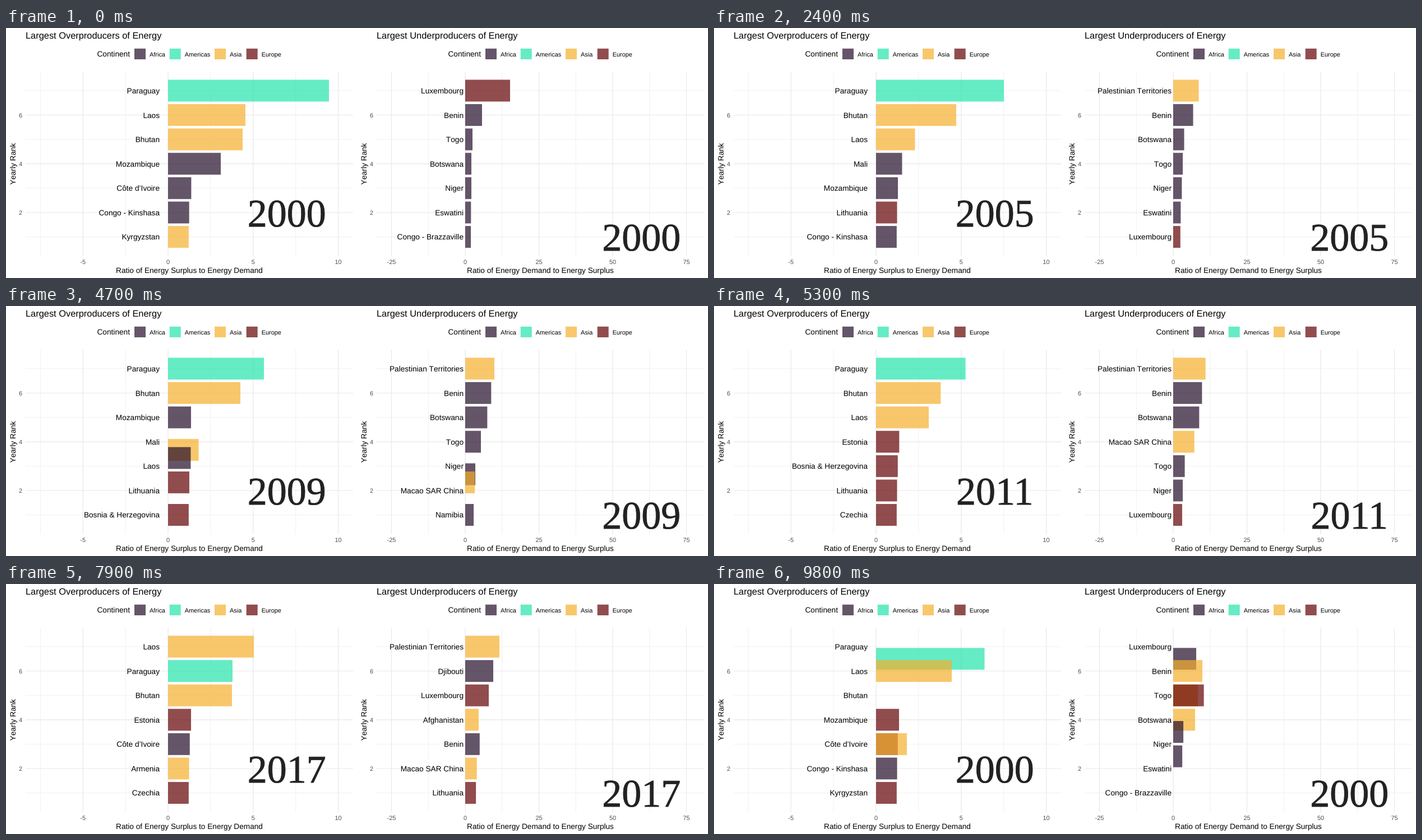
These frames come from a looping animation (1252 px wide and 447 px high, 9.9 s). An HTML page:

```html
<!DOCTYPE html>
<html lang="en">
<head>
<meta charset="utf-8">
<title>Energy ratios by country</title>
<style>
  html, body { margin: 0; width: 100%; height: 100%; overflow: hidden; background: #fff; }
  svg { display: block; width: 1252px; height: 447px; }
  text { font: 13.67px "Liberation Sans", Arial, sans-serif; font-kerning: none; text-rendering: geometricPrecision; }
  .title { font-size: 16.4px; }
  .small { font-size: 10.93px; }
  .tick { font-size: 10.93px; fill: #4d4d4d; }
  .mid { text-anchor: middle; }
  .end { text-anchor: end; }
  .year { font: 70px "Liberation Serif", Times, serif; fill: #222; stroke: #222; stroke-width: .8; text-anchor: middle; }
  .grid { stroke: #ebebeb; }
</style>
</head>
<body>
<svg viewBox="0 0 1252 447"><g id="base"></g><g id="live"></g></svg>
<script>
const COLORS = { Africa: '#240e2a', Americas: '#24e4ac', Asia: '#f6af2d', Europe: '#630004' };
const ALPHA = 0.7;

const PLACES = {
  Africa: { MZ: 'Mozambique', CI: 'Côte d’Ivoire', CD: 'Congo - Kinshasa', ML: 'Mali', BJ: 'Benin', TG: 'Togo',
    BW: 'Botswana', NE: 'Niger', SZ: 'Eswatini', CG: 'Congo - Brazzaville', NA: 'Namibia', DJ: 'Djibouti' },
  Americas: { PY: 'Paraguay' },
  Asia: { LA: 'Laos', BT: 'Bhutan', KG: 'Kyrgyzstan', TM: 'Turkmenistan', AM: 'Armenia',
    PS: 'Palestinian Territories', MO: 'Macao SAR China', AF: 'Afghanistan' },
  Europe: { LT: 'Lithuania', EE: 'Estonia', CZ: 'Czechia', BA: 'Bosnia &amp; Herzegovina', LU: 'Luxembourg' }
};
const place = {};
for (const area in PLACES)
  for (const code in PLACES[area]) place[code] = { name: PLACES[area][code], area };

// ranking: one row per year, best first.
// lead: lengths of the top bars at the key years; tail: rule for the bars below them.
const KEY_YEARS = [0, 3, 7, 9, 10, 13, 17, 21];
const CHARTS = [{
  dx: 0, zero: 289, unit: 30.36, step: 5, to: 2, labelX: 274, yearX: 500.7, yearY: 354.5, upward: true,
  title: 'Largest Overproducers of Energy', axis: 'Ratio of Energy Surplus to Energy Demand',
  ranking: `PY LA BT MZ CI CD KG
    PY BT LA MZ ML CI CD
    PY BT LA ML LT CD CI
    PY BT LA ML LT CI CD
    PY BT LA ML LT CI MZ
    PY BT LA ML MZ LT CD
    PY BT LA ML EE MZ CZ
    PY BT LA ML MZ EE CZ
    BT PY LA ML MZ LT EE
    PY BT MZ ML LA LT BA
    PY BT LA EE LT ML BA
    PY BT LA EE BA LT CZ
    PY LA BT EE BA CZ KG
    PY LA BT EE BA CZ TM
    PY LA BT EE CZ BA TM
    PY LA BT EE BA CZ AM
    PY LA BT EE CI CZ AM
    LA PY BT EE CI AM CZ
    LA PY BT EE BA AM CZ
    LA BT PY EE BA CZ AM
    LA PY BT EE CZ AM CI
    LA PY BT EE CZ CI LT`,
  lead: [
    [287, 256, 200, 173, 167, 145, 153, 137],
    [138, 113, 173, 135, 117, 112, 115, 100],
    [133, 86, 53, 41, 86, 110, 114, 73]
  ],
  tail: (year, n) => 36 + 5 * 0.55 ** n + 53 * Math.exp(-year / 2.2 - 3 * n)
}, {
  dx: 626, zero: 819, unit: 5.26, step: 25, to: 3, labelX: 816, yearX: 1133.3, yearY: 397.5, upward: false,
  title: 'Largest Underproducers of Energy', axis: 'Ratio of Energy Demand to Energy Surplus',
  ranking: `LU BJ TG BW NE SZ CG
    LU BJ BW TG SZ NE CG
    BJ PS LU BW TG SZ NE
    BJ PS BW TG SZ LU NE
    PS BJ BW TG SZ NE LU
    PS BJ BW TG NE SZ LU
    PS BW BJ TG NE SZ LU
    PS BW BJ TG NE SZ NA
    PS BJ BW TG NE SZ NA
    PS BJ BW TG NE MO NA
    PS BJ BW TG MO NE NA
    PS BJ BW MO TG NE LU
    BJ PS MO TG BW LU AF
    BJ MO PS TG BW AF LU
    BJ MO PS TG LU AF BW
    MO PS BJ LU TG AF LT
    PS MO BJ LU AF DJ LT
    PS DJ LU AF BJ MO LT
    PS DJ LU AF MO BJ LT
    PS DJ MO AF LU BJ TG
    DJ PS MO AF LU BJ TG
    DJ PS MO AF LU TG BJ`,
  lead: [
    [80, 44, 47, 52, 52, 69, 61, 52],
    [30, 43, 28, 46, 47, 60, 50, 52],
    [13, 19, 20, 38, 42, 55, 42, 44],
    [11, 15, 19, 25, 34, 45, 24, 39]
  ],
  tail: (year, n) => 10 + 0.5 * year + (1 + 0.37 * year) * 0.3 ** n
}];

const YEARS = 22, ROW = 43.58, LOOP = 9900;
const rowY = i => 112 + i * ROW;
const mix = (a, b, p) => a + (b - a) * p;
const text = (x, y, s, cls = '', more = '') => `<text x="${x}" y="${y}" class="${cls}" ${more}>${s}</text>`;
const rect = (x, y, w, h, area) =>
  `<rect x="${x}" y="${y}" width="${w}" height="${h}" fill="${COLORS[area]}" fill-opacity="${ALPHA}"/>`;
const line = (x1, y1, x2, y2, major) =>
  `<line class="grid" x1="${x1}" y1="${y1}" x2="${x2}" y2="${y2}" stroke-width="${major ? 1.4 : 0.75}"/>`;

function barLength({ lead, tail }, year, i) {
  if (i >= lead.length) return tail(year, i - lead.length);
  const b = Math.max(1, KEY_YEARS.findIndex(k => k >= year)), a = b - 1;
  return mix(lead[i][a], lead[i][b], (year - KEY_YEARS[a]) / (KEY_YEARS[b] - KEY_YEARS[a]));
}

for (const c of CHARTS) {
  c.years = c.ranking.split('\n').map((row, year) => {
    const bars = row.trim().split(' ').map((code, i) => ({ ...place[code], i, w: barLength(c, year, i) }));
    return c.upward ? bars.reverse() : bars;
  });
}

function backdrop(c) {
  const left = 35 + c.dx, right = 619 + c.dx;
  let s = '';
  for (let i = 0; i < 7; i++) {
    const major = i % 2;
    s += line(left, rowY(i), right, rowY(i), major);
    if (major) s += text(29 + c.dx, rowY(i) + 4.2, 7 - i, 'tick end');
  }
  for (let k = -1.5; k <= c.to; k += 0.5) {
    const x = c.zero + k * c.step * c.unit, major = Number.isInteger(k);
    if (x < left) continue;
    s += line(x, 78, x, 408, major);
    if (major) s += text(x, 422, k * c.step, 'tick mid');
  }
  s += text(left, 18.7, c.title, 'title');
  s += text(327 + c.dx, 437.7, c.axis, 'mid');
  s += text(0, 0, 'Yearly Rank', 'mid', `transform="translate(${16.5 + c.dx} 243) rotate(-90)"`);
  s += text(162.5 + c.dx, 51.3, 'Continent');
  const keyX = { Africa: 229, Americas: 291.7, Asia: 372, Europe: 428.7 };
  for (const area in keyX)
    s += rect(keyX[area] + c.dx, 36.8, 20, 19.2, area) + text(keyX[area] + 27 + c.dx, 50.5, area, 'small');
  return s;
}

// Bars pair up by their order within a continent; unpaired ones wait for the end of the step.
function tween(from, to, p) {
  if (p <= 0) return from;
  if (p >= 1) return to;
  const used = {};
  return from.map(a => {
    const n = used[a.area] = (used[a.area] ?? -1) + 1;
    const b = to.filter(d => d.area === a.area)[n] || a;
    return { area: a.area, i: mix(a.i, b.i, p), w: mix(a.w, b.w, p) };
  });
}

// Time is counted in tenths of a second; later years follow each other faster.
const startOf = k => k < 10 ? 2 + 5 * k : k < 13 ? 1 + 5 * k : 14 + 4 * k;

function draw(tick) {
  let k = 0;
  while (k < YEARS - 1 && startOf(k + 1) <= tick) k++;
  const next = (k + 1) % YEARS;
  const p = Math.max(0, Math.min(1, (tick - startOf(k) + 1) / (k < 13 ? 3 : 2)));
  const shown = p < 0.5 ? k : next;
  let s = '';
  for (const c of CHARTS) {
    for (const b of tween(c.years[k], c.years[next], p))
      s += rect(c.zero, rowY(b.i) - 19.5, b.w, 39, b.area);
    for (const b of c.years[shown])
      s += text(c.labelX, rowY(b.i) + 5, b.name, 'end');
    s += text(c.yearX, c.yearY, 2000 + shown, 'year');
  }
  live.innerHTML = s;
}

const live = document.getElementById('live');
document.getElementById('base').innerHTML = CHARTS.map(backdrop).join('');

const t0 = performance.now();
let last = -1;
function loop() {
  const tick = Math.floor((performance.now() - t0) % LOOP / 100);
  if (tick !== last) draw(last = tick);
  requestAnimationFrame(loop);
}
loop();
</script>
</body>
</html>
```
